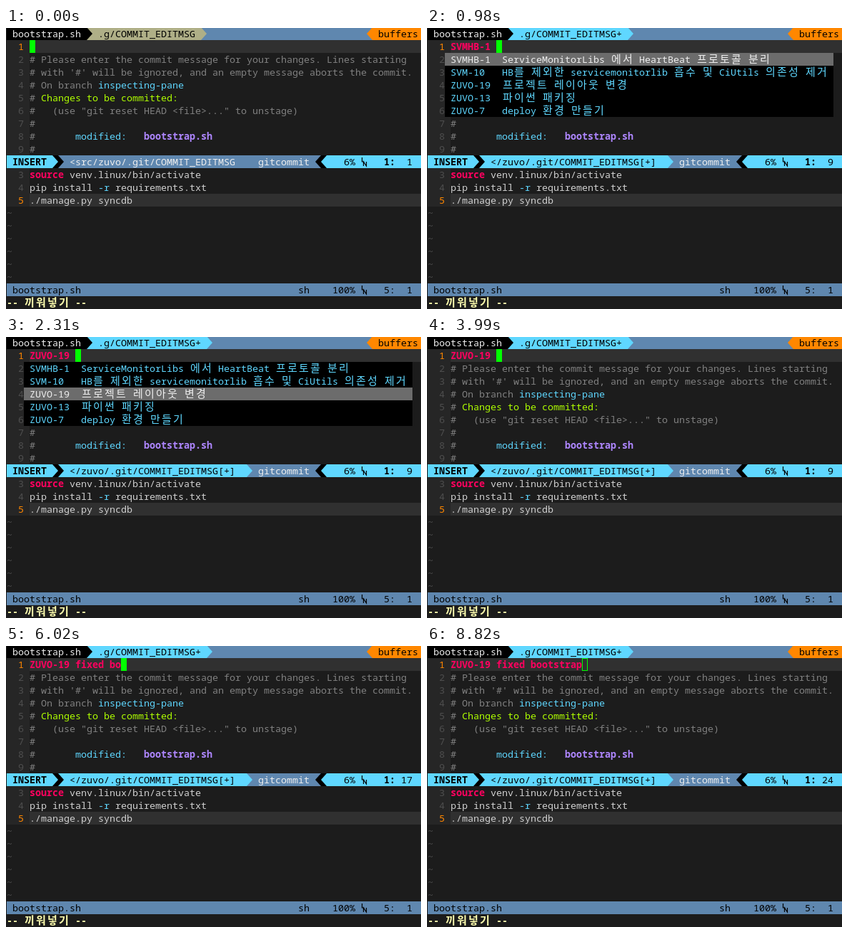
An HTML page that plays this animation: 581 by 395 pixels, repeating every 8.89 s.

```html
<!DOCTYPE html>
<html lang="ko">
<head>
<meta charset="utf-8">
<title>Commit message completion</title>
<style>
html, body { margin: 0; width: 100%; height: 100%; overflow: hidden; background: #1c1c1c; }
svg { display: block; }
text { font: 13.333px "Noto Sans Mono", "DejaVu Sans Mono", monospace; white-space: pre; }
text.wide { font: 15px "Noto Sans CJK KR", "Noto Sans Mono CJK KR", "Noto Sans CJK JP", sans-serif; text-anchor: middle; }
text.bold { font-weight: 700; }
</style>
</head>
<body>
<svg width="581" height="395"><g id="screen" transform="translate(1 -1)"></g></svg>
<script>
const W = 8, H = 18, COLS = 73, LOOP = 8890;
const C = {
  bg: '#1c1c1c', gutter: '#262626', line: '#303030', dim: '#4e4e4e', text: '#d0d0d0',
  comment: '#808080', cyan: '#5fd7ff', steel: '#5f87af', pink: '#ff005f', lime: '#afff00',
  violet: '#af87ff', orange: '#ff8700', olive: '#afaf87', cream: '#ffffaf', black: '#000',
  pick: '#6c6c6c', white: '#eeeeee', cursor: '#00ff00'
};
const ISSUES = [
  ['SVMHB-1', 'ServiceMonitorLibs 에서 HeartBeat 프로토콜 분리'],
  ['SVM-10', 'HB를 제외한 servicemonitorlib 흡수 및 CiUtils 의존성 제거'],
  ['ZUVO-19', '프로젝트 레이아웃 변경'],
  ['ZUVO-13', '파이썬 패키징'],
  ['ZUVO-7', 'deploy 환경 만들기']
];
const TYPED = 'fixed bootstrap';
const KEYS = [4830, 4970, 5040, 5250, 5530, 5740, 5880, 6020, 6160, 6230, 6370, 6440, 6580, 6720, 6930];

const screen = document.getElementById('screen');

function add(tag, attrs, content) {
  const el = document.createElementNS('http://www.w3.org/2000/svg', tag);
  for (const k in attrs) el.setAttribute(k, attrs[k]);
  if (content) el.textContent = content;
  screen.append(el);
}

function box(row, col, cols, fill) {
  add('rect', { x: col * W, y: row * H, width: cols * W, height: H, fill });
}

// Hangul syllables take two cells, everything else one.
function put(row, col, str, fill, bold) {
  const weight = bold ? ' bold' : '';
  for (const part of str.match(/[가-힣]| +|[^ 가-힣]+/g) || []) {
    const wide = /[가-힣]/.test(part);
    if (part[0] !== ' ')
      add('text', { x: (col + (wide ? 1 : 0)) * W, y: row * H + 14, fill, class: (wide ? 'wide' : 'mono') + weight }, part);
    col += wide ? 2 : part.length;
  }
}

function arrow(row, col, fill, back, left) {
  box(row, col, 1, back);
  const base = (left ? col + 1 : col) * W, tip = (left ? col : col + 1) * W, y = row * H;
  add('path', { d: `M${base} ${y}L${tip} ${y + H / 2}L${base} ${y + H}Z`, fill });
}

function lineMark(row, col) {
  add('path', {
    d: `M${col * W + 1.5} ${row * H + 3}v6h3M${col * W + 3.5} ${row * H + 15}v-6l4 6v-6`,
    fill: 'none', stroke: C.black, 'stroke-width': 1.2
  });
}

function position(row, percent, line, col, bold) {
  put(row, 57, percent.padStart(4), C.black);
  lineMark(row, 62);
  put(row, 66, line + ':', C.black, bold);
  put(row, 68, String(col).padStart(3), C.black);
}

function tabs(changed) {
  const tone = changed ? C.cyan : C.olive, end = changed ? 35 : 34;
  box(0, 0, COLS, C.steel);
  box(0, 0, 14, C.black);
  put(0, 1, 'bootstrap.sh', C.white);
  box(0, 14, end - 14, tone);
  arrow(0, 14, C.black, tone);
  put(0, 16, '.g/COMMIT_EDITMSG' + (changed ? '+' : ''), C.black);
  arrow(0, end, tone, C.steel);
  arrow(0, 63, C.orange, C.steel, true);
  box(0, 64, 9, C.orange);
  put(0, 65, 'buffers', C.black);
}

function number(row, n, current) {
  box(row, 0, 4, C.gutter);
  if (current) box(row, 4, COLS - 4, C.line);
  put(row, 2, String(n), current ? C.orange : C.dim);
}

function message(text) {
  for (let n = 1; n < 10; n++) {
    number(n, n, n === 1);
    if (n > 1) put(n, 4, '#', C.comment);
  }
  put(1, 4, text, C.pink, true);
  put(2, 6, 'Please enter the commit message for your changes. Lines starting', C.comment);
  put(3, 6, "with '#' will be ignored, and an empty message aborts the commit.", C.comment);
  put(4, 6, 'On branch', C.comment);
  put(4, 16, 'inspecting-pane', C.cyan);
  put(5, 6, 'Changes to be committed:', C.lime);
  put(6, 8, '(use "git reset HEAD <file>..." to unstage)', C.comment);
  put(8, 12, 'modified:', C.cyan);
  put(8, 24, 'bootstrap.sh', C.violet, true);
}

function status(changed, col) {
  const tone = changed ? C.cyan : C.steel;
  box(10, 0, COLS, C.steel);
  box(10, 0, 8, C.cyan);
  put(10, 1, 'INSERT', C.black, true);
  box(10, 10, 32, tone);
  arrow(10, 8, C.cyan, C.black);
  arrow(10, 9, C.black, tone);
  put(10, 11, changed ? '</zuvo/.git/COMMIT_EDITMSG[+]' : '<src/zuvo/.git/COMMIT_EDITMSG', changed ? C.black : C.white);
  if (changed) arrow(10, 42, C.cyan, C.steel);
  put(10, 44, 'gitcommit', C.white);
  arrow(10, 54, C.black, C.steel, true);
  arrow(10, 55, C.cyan, C.black, true);
  box(10, 56, 17, C.cyan);
  position(10, '6%', 1, col, true);
}

function script() {
  for (let n = 3; n < 6; n++) number(n + 8, n, n === 5);
  put(11, 4, 'source', C.pink, true);
  put(11, 11, 'venv.linux/bin/activate', C.text);
  put(12, 4, 'pip install', C.text);
  put(12, 16, '-r', C.cyan);
  put(12, 19, 'requirements.txt', C.text);
  put(13, 4, './manage.py syncdb', C.text);
  for (let row = 14; row < 20; row++) put(row, 0, '~', C.dim);
  box(20, 0, COLS, C.steel);
  put(20, 1, 'bootstrap.sh', C.black);
  put(20, 51, 'sh', C.black);
  position(20, '100%', 5, 1);
}

function popup(pick) {
  ISSUES.forEach(([key, title], i) => {
    const on = i === pick, fill = on ? C.white : C.cyan;
    box(2 + i, 3, 68, on ? C.pick : C.black);
    put(2 + i, 4, key, fill);
    put(2 + i, 13, title, fill);
  });
}

function cursor(col, hollow) {
  if (hollow) add('rect', { x: col * W + .5, y: H + .5, width: W - 1, height: H - 1, fill: 'none', stroke: C.cursor });
  else box(1, col, 1, C.cursor);
}

const key = i => ISSUES[i][0] + ' ';
const STEPS = [
  { at: 0, text: '' },
  { at: 770, text: '', busy: true },
  { at: 980, text: key(0), pick: 0 },
  { at: 1680, text: key(1), pick: 1 },
  { at: 2310, text: key(2), pick: 2 },
  { at: 3990, text: key(2) },
  ...KEYS.map((at, i) => ({ at, text: key(2) + TYPED.slice(0, i + 1) })),
  { at: 8820, text: key(2) + TYPED, hollow: true }
];

function draw({ text, pick, busy, hollow }) {
  const changed = text !== '', open = pick !== undefined;
  screen.replaceChildren();
  tabs(changed);
  message(text);
  // The status line keeps its column while the menu is open.
  status(changed, open ? 9 : text.length + 1);
  script();
  if (open) popup(pick);
  if (!busy) {
    cursor(4 + text.length, hollow);
    put(21, 0, '-- 끼워넣기 --', C.cream, true);
  }
}

let shown, start;
function tick(now) {
  start ??= now;
  const t = (now - start) % LOOP;
  const step = STEPS.findLast(s => s.at <= t) || STEPS[0];
  if (step !== shown) draw(shown = step);
  requestAnimationFrame(tick);
}
draw(shown = STEPS[0]);
requestAnimationFrame(tick);
</script>
</body>
</html>
```
